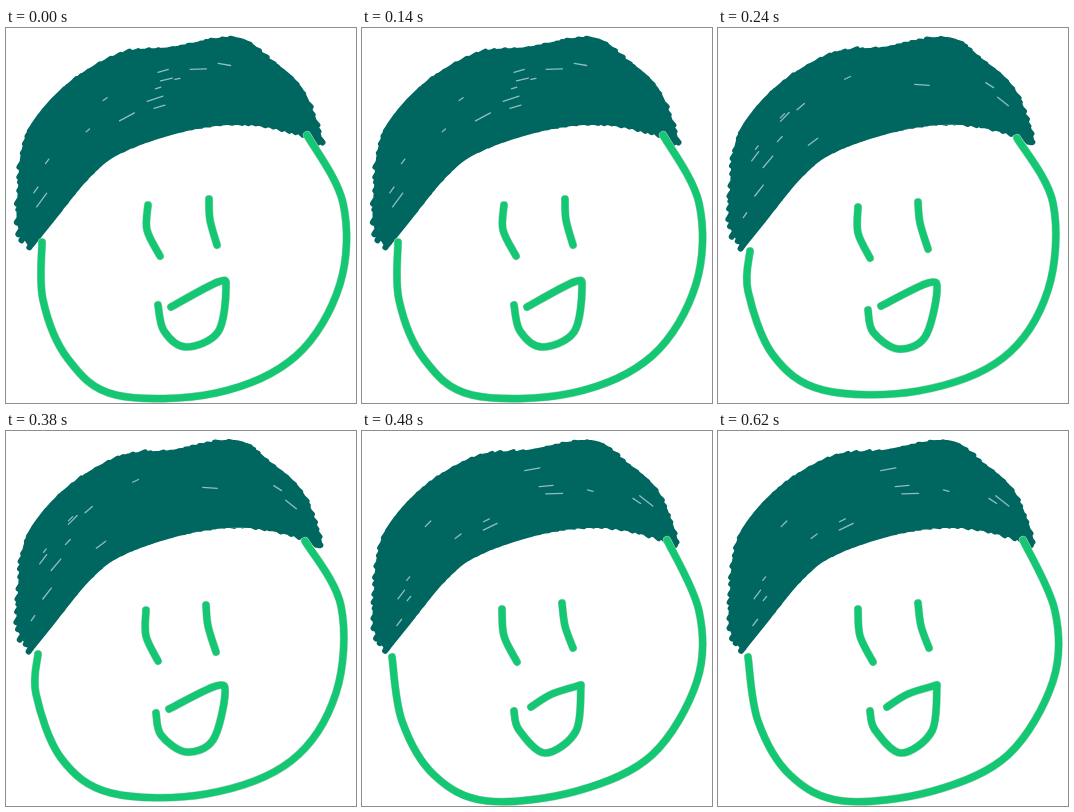
Recreate the animation shown at these times as an HTML page. Size 350x375 px, loop 0.72 s.

```html
<!DOCTYPE html>
<html lang="en">
<head>
<meta charset="utf-8">
<title>Smiling doodle</title>
<style>
  html, body { margin: 0; width: 100%; height: 100%; overflow: hidden; background: #fff; }
  svg { display: block; width: 350px; height: 375px; }
  path { fill: none; stroke-linecap: round; stroke-linejoin: round; }
  .halo { stroke: #b9d3c6; stroke-width: 8.2; }
  .pen { stroke: #14c873; stroke-width: 7.2; }
  .hair { fill: #006660; stroke: #006660; stroke-width: 6; }
  .gap { stroke: #cfe3e0; stroke-width: 1.3; opacity: .7; }
</style>
</head>
<body>
<svg id="stage" viewBox="0 0 350 375"></svg>
<script>
const STEP = 240;

// Shared hair shape: up the left side, over the top, back along the hairline.
const HAIR = '25,217 14,195 15,160 18,125 30,94 67,55 117,27 165,22 229,12 262,33 294,62 313,112 ' +
  '298,105 244,94 185,99 117,121 82,147 46,191 25,217';

// Each pose redraws the lines through its own few key points.
const POSES = [
  {
    seed: 3,
    face: '36,214 37,272 62,331 110,367 210,365 290,328 334,256 337,175 301,107',
    eyes: ['142,177 141,202 154,228', '203,171 204,192 211,217'],
    mouth: ['165,279 212,254 220,260 212,304 180,319 158,303 152,277']
  },
  {
    seed: 8,
    face: '32,223 30,263 55,327 105,362 200,363 285,330 330,262 335,175 299,110',
    eyes: ['140,179 140,205 152,230', '200,174 202,195 210,221'],
    mouth: ['163,278 210,255 219,263 207,309 180,321 155,304 150,282']
  },
  {
    seed: 21,
    face: '30,226 40,290 72,344 125,370 215,360 290,324 335,250 337,180 305,109',
    eyes: ['140,178 142,205 155,231', '200,172 203,195 211,217'],
    mouth: ['169,276 190,263 219,254', '219,254 214,300 183,322 157,299 152,280']
  }
];

const stage = document.getElementById('stage');

function add(parent, className, d) {
  const node = document.createElementNS('http://www.w3.org/2000/svg', className ? 'path' : 'g');
  if (className) {
    node.setAttribute('class', className);
    node.setAttribute('d', d);
  }
  parent.append(node);
  return node;
}

// Smooth curve through all points (Catmull-Rom as cubic Béziers).
function curve(text) {
  const pts = text.split(' ').map(pair => pair.split(',').map(Number));
  let d = 'M' + pts[0];
  for (let i = 0; i < pts.length - 1; i++) {
    const a = pts[i], b = pts[i + 1];
    const before = pts[i - 1] || a, after = pts[i + 2] || b;
    const c1 = a.map((v, k) => v + (b[k] - before[k]) / 6);
    const c2 = b.map((v, k) => v - (after[k] - a[k]) / 6);
    d += `C${c1} ${c2} ${b}`;
  }
  return d;
}

function seeded(seed) {
  return () => {
    seed = (seed * 16807) % 2147483647;
    return seed / 2147483647;
  };
}

// A short scribble along the hair's flow: steep on the left, falling on the right.
function scribble(x, y, length) {
  const across = Math.max(0, (x - 10) / 300);
  const angle = (-58 + 108 * across ** 1.3) * Math.PI / 180;
  const dx = Math.cos(angle) * length / 2, dy = Math.sin(angle) * length / 2;
  return `M${x - dx},${y - dy}L${x + dx},${y + dy}`;
}

function drawHair(group, seed) {
  const random = seeded(seed * 7919);
  const shape = curve(HAIR);
  const hair = add(group, 'hair', shape);
  const total = hair.getTotalLength();
  const at = part => hair.getPointAtLength(part * total);

  let fringe = '';
  for (let s = 0; s < total; s += 6 + 6 * random()) {
    const { x, y } = at(s / total);
    fringe += scribble(x, y, 4 + 9 * random());
  }

  let gaps = '';
  for (let i = 0; i < 14; i++) {
    const u = 0.08 + 0.8 * random(), mix = 0.2 + 0.6 * random();
    const top = at(0.57 * u), low = at(1 - 0.43 * u);
    const x = top.x + (low.x - top.x) * mix, y = top.y + (low.y - top.y) * mix;
    gaps += scribble(x, y, 4 + 13 * random());
  }

  hair.setAttribute('d', shape + fringe);
  add(group, 'gap', gaps);
}

function drawPose({ seed, face, eyes, mouth }) {
  const group = add(stage);
  drawHair(group, seed);
  const lines = [face, ...eyes, ...mouth].map(curve).join('');
  add(group, 'halo', lines);
  add(group, 'pen', lines);
  return group;
}

const groups = POSES.map(drawPose);
const start = performance.now();

function show() {
  const elapsed = Math.max(0, performance.now() - start);
  const current = Math.floor(elapsed / STEP) % groups.length;
  groups.forEach((group, i) => { group.style.display = i === current ? '' : 'none'; });
  requestAnimationFrame(show);
}
show();
</script>
</body>
</html>
```
